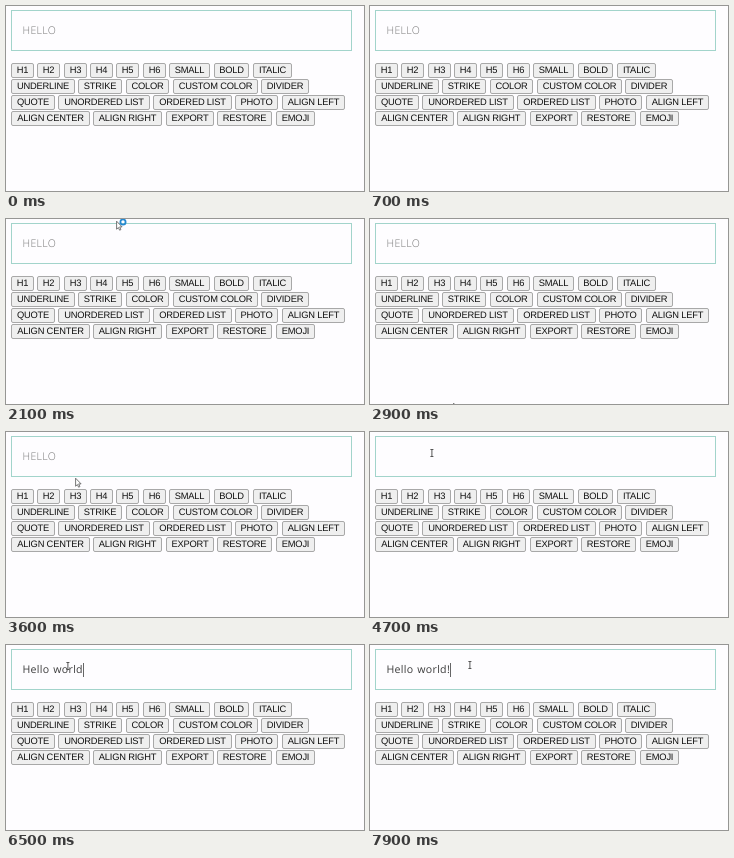
An HTML page with a canvas that plays this animation: 358 by 185 pixels, repeating every 8000 ms.

```html
<!DOCTYPE html>
<html lang="en">
<head>
<meta charset="utf-8">
<title>Text editor</title>
<style>
html, body { margin: 0; width: 100%; height: 100%; overflow: hidden; background: #fefdff; }
#stage { position: relative; width: 358px; height: 185px; overflow: hidden; text-rendering: geometricPrecision; }
#stage > * { position: absolute; box-sizing: border-box; }
#editor { left: 5px; top: 4px; width: 341px; height: 41px; border: 1px solid #a2d4cb; }
#text { left: 16.5px; top: 17px; font: 10.6px/16px "Open Sans", sans-serif; letter-spacing: .3px; word-spacing: .7px;
  white-space: pre; color: #3c3c3c; }
#text.hint { font-weight: 300; color: #777; }
.btn { height: 15px; border: 1px solid #a8a8a8; border-radius: 2px; background: #efefef; color: #111;
  font: 9.33px/13px "Liberation Sans", Arial, sans-serif; letter-spacing: -.2px; text-align: center; white-space: nowrap; }
.btn.over { background: #e5e5e5; border-color: #8a8a8a; }
canvas { left: 0; top: 0; }
</style>
</head>
<body>
<div id="stage">
  <div id="editor"></div>
  <div id="text" class="hint">HELLO</div>
  <canvas id="top" width="358" height="185"></canvas>
</div>
<script>
const LOOP = 8000, STEP = 100;
const CLICK = 4200, TYPE = 5000, KEY = 140, BANG = 6900;
const PHRASE = "Hello world";

// Each row: label, left edge, width
const rows = [
  [["H1", 5, 23], ["H2", 31, 23], ["H3", 58, 23], ["H4", 84, 23], ["H5", 110, 23], ["H6", 137, 23],
   ["SMALL", 163, 41], ["BOLD", 208, 35], ["ITALIC", 247, 39]],
  [["UNDERLINE", 5, 64], ["STRIKE", 72, 44], ["COLOR", 120, 43], ["CUSTOM COLOR", 167, 85], ["DIVIDER", 255, 48]],
  [["QUOTE", 5, 44], ["UNORDERED LIST", 52, 92], ["ORDERED LIST", 147, 79], ["PHOTO", 229, 43], ["ALIGN LEFT", 276, 63]],
  [["ALIGN CENTER", 5, 79], ["ALIGN RIGHT", 87, 69], ["EXPORT", 160, 48], ["RESTORE", 211, 55], ["EMOJI", 270, 39]]
];

// Pointer path: time, x, y
const path = [
  [1900, 112, -5], [2100, 111, 2], [2300, 106, 50], [2500, 98, 125], [2700, 90, 192],
  [2900, 84, 184], [3200, 78, 118], [3400, 73, 70], [3600, 70, 46], [3800, 67, 38], [4000, 62, 21],
  [7300, 62, 21], [7800, 100, 20], [8000, 100, 20]
];

const stage = document.getElementById("stage");
const text = document.getElementById("text");
const ctx = document.getElementById("top").getContext("2d");
const buttons = [];

rows.forEach((row, r) => row.forEach(([label, x, w]) => {
  const el = document.createElement("div");
  const y = 57 + r * 16;
  el.className = "btn";
  el.textContent = label;
  el.style.cssText = `left:${x}px;top:${y}px;width:${w}px`;
  stage.insertBefore(el, ctx.canvas);
  buttons.push({ el, x, y, w });
}));

function pointerAt(t) {
  const i = path.findIndex(p => p[0] > t);
  if (i < 1) return null;
  const [t0, x0, y0] = path[i - 1], [t1, x1, y1] = path[i];
  const k = (t - t0) / (t1 - t0);
  return { x: Math.round(x0 + (x1 - x0) * k), y: Math.round(y0 + (y1 - y0) * k) };
}

function drawArrow({ x, y }) {
  ctx.beginPath();
  [[0, 0], [0, 8], [1.8, 6.4], [3, 9], [4.3, 8.4], [3.1, 5.7], [5.5, 5.7]]
    .forEach(([dx, dy]) => ctx.lineTo(x - .4 + dx, y + .2 + dy));
  ctx.closePath();
  ctx.fillStyle = "#fff";
  ctx.fill();
  ctx.strokeStyle = "#555";
  ctx.lineWidth = .8;
  ctx.stroke();
}

function drawRing({ x, y }) {
  ctx.beginPath();
  ctx.arc(x + 6, y + 1, 2.6, 0, Math.PI * 2);
  ctx.strokeStyle = "#2589d0";
  ctx.lineWidth = 1.8;
  ctx.stroke();
}

function drawBeam({ x, y }) {
  ctx.fillStyle = "#555";
  ctx.fillRect(x - .6, y - 3, 1, 6);
  ctx.fillRect(x - 1.6, y - 4, 3, 1);
  ctx.fillRect(x - 1.6, y + 3, 3, 1);
}

function render(t) {
  const count = t < TYPE ? 0 : Math.min(PHRASE.length, Math.floor((t - TYPE) / KEY) + 1);
  const typed = PHRASE.slice(0, count) + (t >= BANG ? "!" : "");
  const focused = t >= CLICK;
  text.className = focused ? "" : "hint";
  text.textContent = focused ? typed : "HELLO";

  ctx.clearRect(0, 0, 358, 185);
  if (focused) {
    const last = t >= BANG ? BANG : count ? TYPE + (count - 1) * KEY : CLICK;
    if (Math.floor((t - last) / 500) % 2 === 0) {
      ctx.fillStyle = "#666";
      ctx.fillRect(Math.round(16.5 + text.getBoundingClientRect().width), 18, 1, 14);
    }
  }

  const p = pointerAt(t);
  for (const b of buttons) {
    const over = p && p.x >= b.x && p.x < b.x + b.w && p.y >= b.y && p.y < b.y + 15;
    b.el.classList.toggle("over", !!over);
  }
  if (!p) return;
  if (t >= 3700) return drawBeam(p);
  drawArrow(p);
  if (t < 2600) drawRing(p);
}

const start = performance.now();
function tick() {
  const t = (performance.now() - start) % LOOP;
  render(Math.floor(t / STEP) * STEP);
  requestAnimationFrame(tick);
}
tick();
</script>
</body>
</html>
```
